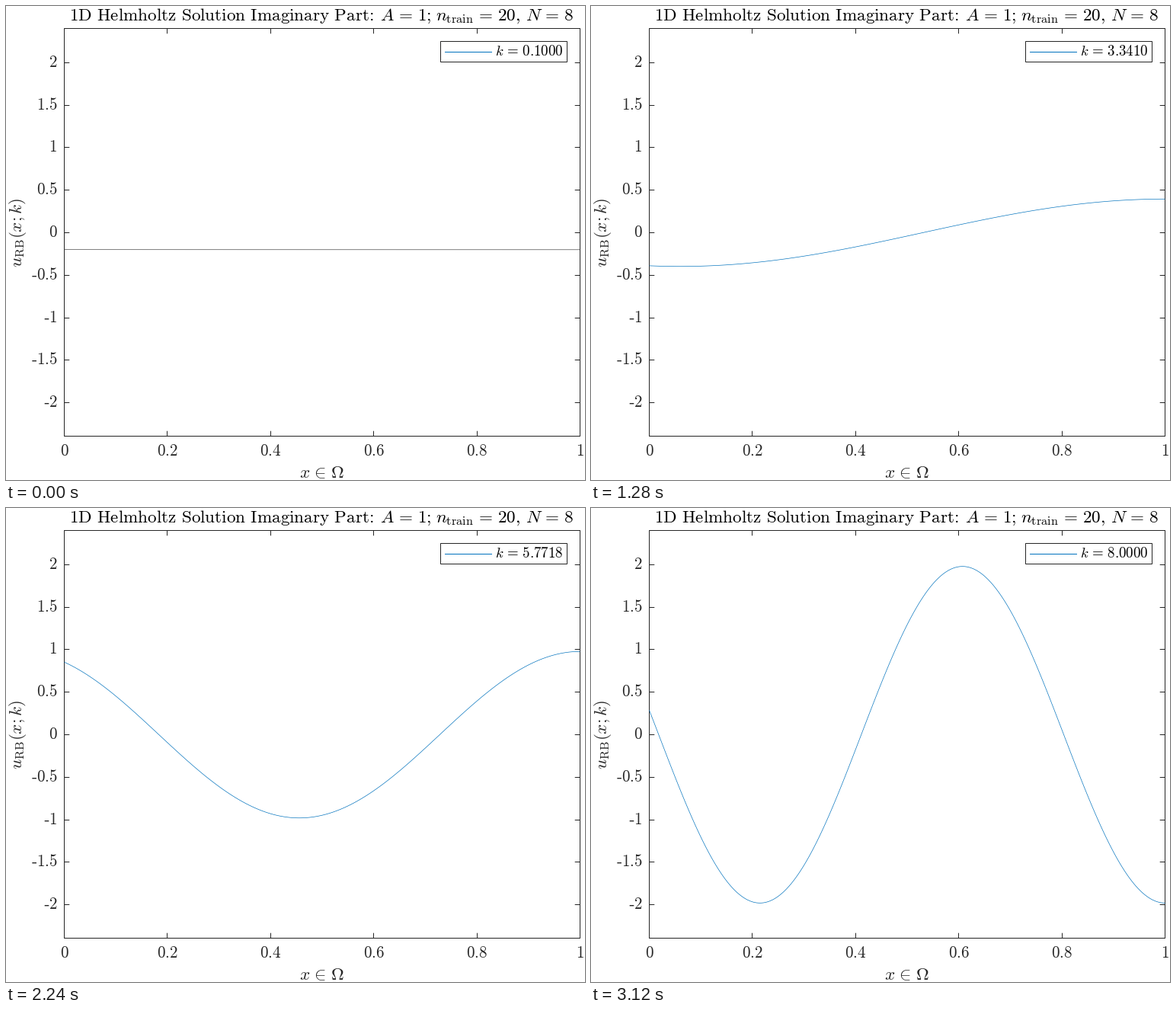
A matplotlib script that plays this animation: 760x622 px, repeating every 3.2 s.

```python
import numpy as np
import matplotlib.pyplot as plt
from matplotlib.animation import FuncAnimation
from matplotlib.patches import Rectangle

W, H, DPI = 760, 622, 100
LEFT, RIGHT, TOP, BOTTOM = 76.5, 753.5, 29.5, 564.5
ZERO, UNIT = 297.5, 111.6               # pixel row of u = 0, pixels per unit
STEPS, STEP_MS = 40, 80
K = np.linspace(0.1, 8.0, STEPS)

INK, BLUE, GREY = "#262626", "#0072BD", "#404040"
PX = 72 / DPI
LABEL, TICK, LEGEND = 23.1, 21, 18.9    # font sizes in pixels

SP = r"\hspace{0.367}"
EQ = r"\hspace{0.14}=\hspace{0.14}"

plt.rcParams["mathtext.fontset"] = "cm"
plt.rcParams["path.simplify"] = False

fig = plt.figure(figsize=(W / DPI, H / DPI), dpi=DPI, facecolor="white")
ax = fig.add_axes([0, 0, 1, 1])
ax.set_xlim(0, W)
ax.set_ylim(H, 0)
ax.axis("off")


def to_x(x):
    return LEFT + (RIGHT - LEFT) * x


def to_y(u):
    return ZERO - UNIT * u


def line(xs, ys, color=INK, z=2, width=1):
    return ax.plot(xs, ys, color=color, lw=width * PX, snap=False, zorder=z,
                   solid_capstyle="butt", clip_on=False)[0]


def box(x0, y0, x1, y1, z):
    ax.add_patch(Rectangle((x0, y0), x1 - x0, y1 - y0, fc="white", ec=INK,
                           lw=PX, snap=False, joinstyle="miter", zorder=z))


def put(x, y, tex, size, color=INK, ha="left", **kw):
    return ax.text(x, y, f"${tex}$", fontsize=size * PX, color=color, ha=ha,
                   va="baseline", zorder=6, **kw)


def rm(s):
    return r"\mathrm{" + s + "}"


def on_pixel(v):
    return np.floor(v) + 0.5


def draw_ticks():
    size = 6.8
    for v in np.arange(0, 1.01, 0.2):
        x = on_pixel(to_x(v))
        line([x, x], [BOTTOM, BOTTOM - size])
        line([x, x], [TOP, TOP + size])
        put(to_x(v), 590, rm(f"{v:.1g}"), TICK, ha="center")
    for v in np.arange(-2, 2.1, 0.5):
        y = on_pixel(to_y(v))
        line([LEFT, LEFT + size], [y, y])
        line([RIGHT, RIGHT - size], [y, y])
        s = f"{abs(v):g}"
        dots = s.count(".")
        x = 68 - TICK * (0.5 * (len(s) - dots) + 0.278 * dots)
        base = y + 5.5
        put(x - 1, base, rm(s), TICK)
        if v < 0:
            ax.add_patch(Rectangle((x - 6.8, base - 5), 5.6, 1.4, fc=INK,
                                   lw=0, snap=False, zorder=6))


def draw_labels():
    words = SP.join(["1D", "Helmholtz", "Solution", "Imaginary", "Part"])
    base = 19
    put(83, base, rm(words + r"\hspace{-0.2}:"), LABEL, "black")
    put(491, base, "A" + EQ + rm("1;"), LABEL, "black")
    put(564.5, base, "n_{" + rm("train") + "}" + EQ + rm("20,"), LABEL, "black")
    put(681.5, base, "N" + EQ + rm("8"), LABEL, "black")
    put(414.75, 619, r"x\hspace{0.117}\in\hspace{0.117}\Omega", LABEL,
        ha="center")
    put(21, 297, "u_{" + rm("RB") + "}(x" + rm(";") + "k)", LABEL,
        ha="center", rotation=90, rotation_mode="anchor")


box(LEFT, TOP, RIGHT, BOTTOM, 1)
draw_ticks()
draw_labels()

curve = line([], [], BLUE, 3, width=0.67)
box(570.5, 46.5, 736.5, 73.5, 4)
line([576, 638], [60.5, 60.5], BLUE, 5)
k_text = put(642, 65, "k", LEGEND, "black")

x = np.linspace(0, 1, 400)


def update(i):
    k = K[i]
    u = -2 * np.sin(k) * np.cos(k * (1 - x))
    curve.set_data(to_x(x), to_y(u))
    curve.set_color(BLUE if i else GREY)
    k_text.set_text("$k" + EQ + rm(f"{k:.4f}") + "$")
    return curve, k_text


anim = FuncAnimation(fig, update, frames=STEPS, interval=STEP_MS,
                     repeat=True, repeat_delay=0, blit=False)
plt.show()
```
